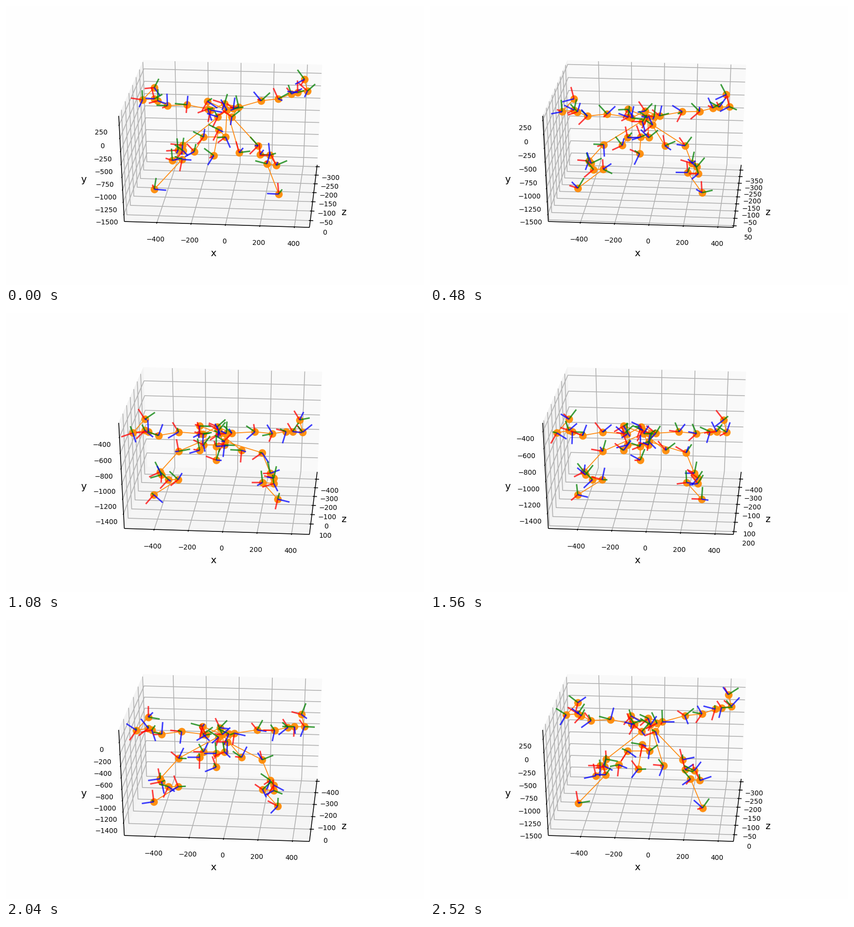
A matplotlib script for the animation above (2.64 s loop, 857x571 px).

```python
import numpy as np
import matplotlib.pyplot as plt
from matplotlib.animation import FuncAnimation
from matplotlib.collections import LineCollection
from matplotlib.ticker import MaxNLocator

W, H, DPI = 857, 571, 128
FRAMES, INTERVAL = 22, 120

# Camera: a unit cube seen from elevation 30, azimuth 5, with padded panes.
ELEV, AZIM = np.radians(30), np.radians(5)
CENTER, SCALE, DIST = (448.2, 278.4), (3590, 2329), 10
PANE = 0.5 + 1 / 48
LABEL_PAD = 0.084

# Rest pose of arms and shoulders on the stage.
UPPER = np.array([
    (304, 167), (280, 192), (304, 190), (311, 194), (331, 204),
    (371, 202), (413, 195), (414, 211), (420, 213), (448, 200),
    (477, 207), (466, 210), (453, 213), (463, 227), (523, 194),
    (558, 190), (585, 180), (598, 177), (618, 174), (612, 150)], float)
# Rest pose of trunk and legs, each with its shift when folded.
LOWER = np.array([
    (434, 227, 2, 13), (436, 253, -5, 20), (450, 268, -2, 2),
    (405, 268, 0, 2), (386, 298, 11, -17), (426, 306, 5, -5),
    (478, 300, 5, -19),
    (362, 285, -8, -2), (353, 295, -37, 30), (363, 296, -44, 35),
    (341, 316, -8, 25), (361, 314, -8, 27), (304, 375, -1, -3),
    (517, 286, 8, 0), (521, 304, 21, 24), (541, 305, 8, 33),
    (535, 323, -9, 24), (554, 326, -5, 23), (559, 385, -2, -4)], float)
CHAINS = [
    [0, 1, 2, 3, 4, 5, 7, 8, 9, 10, 14, 15, 16, 17, 18, 19],
    [7, 6, 12, 11, 10, 13, 33, 34, 35, 37, 36, 38],
    [20, 12, 22, 23, 24],
    [25, 21, 22],
    [26, 12, 27, 28, 29, 30, 31, 32],
]
EDGES = [pair for c in CHAINS for pair in zip(c, c[1:])]


def pt(pixels):
    return pixels * 72 / DPI


def ease(frame, start, end):
    s = np.clip((frame - start) / (end - start), 0, 1)
    return s * s * (3 - 2 * s)


def press(frame):
    return ease(frame, 0, 8.5) - ease(frame, 13.5, 22)


def fold(frame):
    return ease(frame, 0, 6) - ease(frame, 17, 22)


def dip(frame):
    return ease(frame, 2, 11) - ease(frame, 12.5, 19.5)


def joints_at(frame):
    """Upper body sinks, most at the hands; trunk and legs fold."""
    reach = UPPER[:, 0] - 445
    drop = 32 + np.where(reach > 0, 0.22, -0.13) * reach
    sink = np.column_stack([0.03 * reach - 15, drop])
    return np.vstack([UPPER + press(frame) * sink,
                      LOWER[:, :2] + fold(frame) * LOWER[:, 2:]])


def limits_at(frame):
    """Left/right, front/back and bottom/top values of the box."""
    sway = 10 * np.cos(2 * np.pi * (frame - 12) / FRAMES)
    low = dip(frame)
    return [(sway - 560, sway + 475),
            (28 + 190 * low, -304 - 170 * press(frame)),
            (40 * low - 1610, 375 - 715 * low)]


def project(p):
    """Cube point (right, away, up) to stage pixels."""
    x, y, z = p
    right = x * np.cos(AZIM) + y * np.sin(AZIM)
    away = y * np.cos(AZIM) - x * np.sin(AZIM)
    up = away * np.sin(ELEV) + z * np.cos(ELEV)
    depth = DIST + away * np.cos(ELEV) - z * np.sin(ELEV)
    return (CENTER[0] + SCALE[0] * right / depth,
            CENTER[1] - SCALE[1] * up / depth)


def path(*points):
    return [project(p) for p in points]


P = PANE
PANES = [
    ("#f2f2f2", path((-P, -P, -P), (-P, P, -P), (-P, P, P), (-P, -P, P))),
    ("#f9f9f9", path((-P, P, -P), (P, P, -P), (P, P, P), (-P, P, P))),
    ("#f5f5f5", path((-P, -P, -P), (P, -P, -P), (P, P, -P), (-P, P, -P))),
]
SPINES = [
    path((-P, -P, -P), (P, -P, -P)),
    path((P, -P, -P), (P, P, -P)),
    path((-P, -P, -P), (-P, -P, P)),
]
# Per axis: grid corners, tick base, tick direction, label direction.
AXES = [
    (lambda t: [(t, -P, -P), (t, P, -P), (t, P, P)],
     lambda t: (t, -P, -P), (0, -1, 0), (0, -1, -1)),
    (lambda t: [(P, t, -P), (-P, t, -P), (-P, t, P)],
     lambda t: (P, t, -P), (1, 0, 0), (1, 0, -1)),
    (lambda t: [(-P, -P, t), (-P, P, t), (P, P, t)],
     lambda t: (-P, -P, t), (0, -1, 0), (-1, -1, 0)),
]
locator = MaxNLocator(9, steps=[1, 2, 2.5, 5, 10])

fig = plt.figure(figsize=(W / DPI, H / DPI), dpi=DPI, facecolor="#fefefe")
ax = fig.add_axes([0, 0, 1, 1])


def write(x, baseline, text, size):
    ax.text(x, baseline, text, fontsize=pt(size), family="DejaVu Sans",
            ha="center", va="baseline", color="black")


def draw_lines(lines, color, width, z, **style):
    ax.add_collection(LineCollection(
        lines, colors=color, linewidths=pt(width), zorder=z, **style))


def draw_box(frame):
    for color, corners in PANES:
        ax.fill(*zip(*corners), color=color, lw=pt(1), zorder=1)
    grid, ticks = [], []
    for (lo, hi), (corners, base, tick_dir, label_dir) in zip(
            limits_at(frame), AXES):
        low, high = min(lo, hi), max(lo, hi)
        for value in locator.tick_values(low, high):
            if not low <= value <= high:
                continue
            t = (value - lo) / (hi - lo) - 0.5
            grid.append(path(*corners(t)))
            foot, out = np.array(base(t)), np.array(tick_dir)
            ticks.append(path(foot - out / 120, foot + out / 60))
            x, y = project(foot + LABEL_PAD * np.array(label_dir))
            write(x, y + 11, f"{value:.0f}".replace("-", "\u2212"), 13.9)
    draw_lines(grid, "#b0b0b0", 1.6, 2)
    draw_lines(SPINES + ticks, "black", 1.6, 3)
    write(425.5, 512, "x", 19.8)
    write(159, 361, "y", 19.8)
    write(692, 427.5, "z", 19.8)


def draw_skeleton(frame):
    joints = joints_at(frame)
    draw_lines([joints[list(e)] for e in EDGES], "#ff8c14", 1.8, 4)
    ax.plot(*joints.T, "o", ms=pt(15.6), mew=0, color="#ff8800",
            alpha=0.92, zorder=5)
    # Every joint carries a freshly turned red, green and blue triad.
    rng = np.random.default_rng(100 + frame)
    triads = []
    for joint in joints:
        turn, _ = np.linalg.qr(rng.normal(size=(3, 3)))
        triads += [[joint, joint + 25 * axis[:2]] for axis in turn]
    draw_lines(triads, ["red", "green", "blue"] * len(joints), 3, 6,
               alpha=0.75)


def draw(frame):
    ax.clear()
    ax.set(xlim=(0, W), ylim=(H, 0))
    ax.axis("off")
    draw_box(frame)
    draw_skeleton(frame)
    return []


animation = FuncAnimation(fig, draw, frames=FRAMES, interval=INTERVAL,
                          init_func=lambda: [], repeat=True, repeat_delay=0)
plt.show()
```
